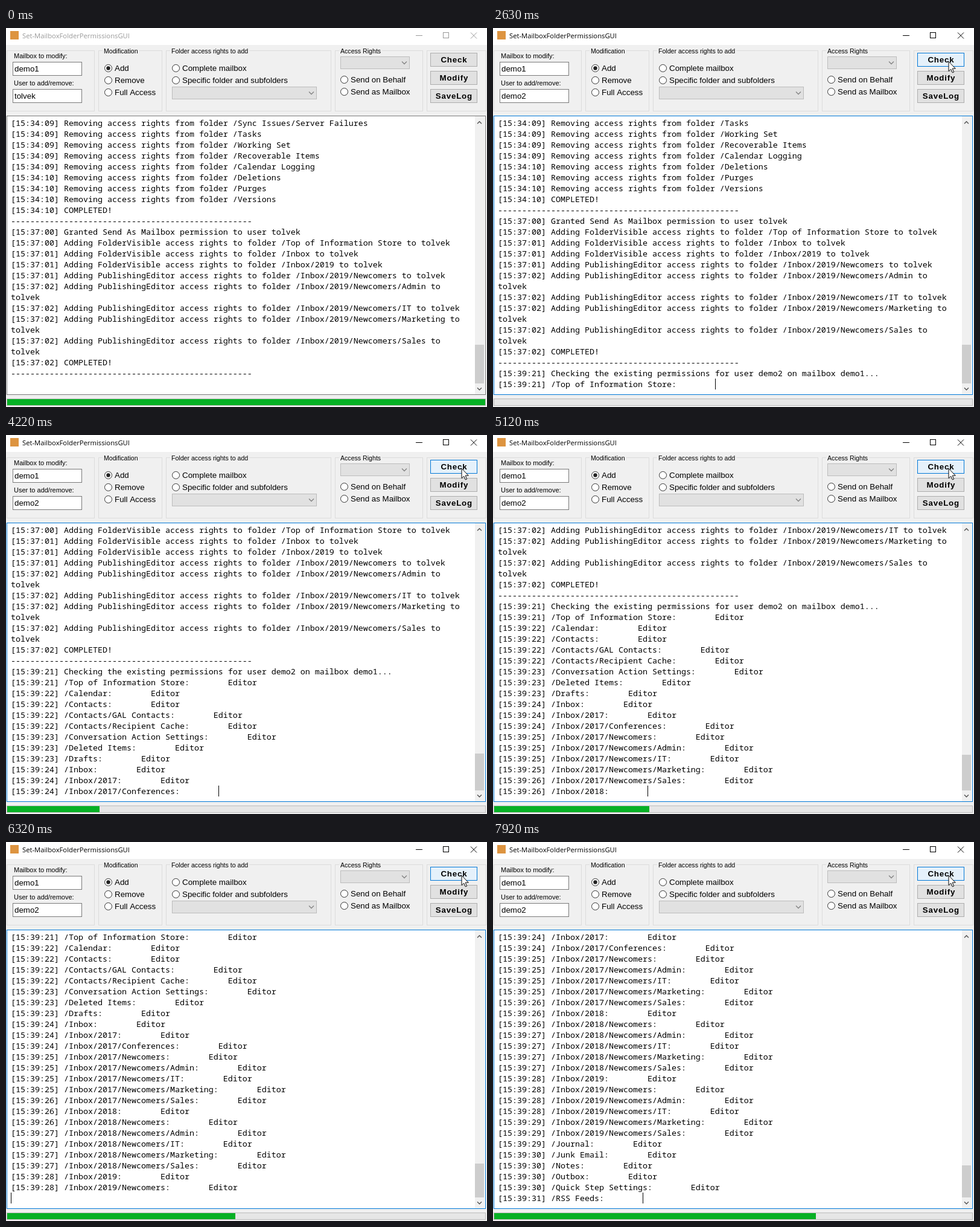
These frames come from a looping animation (797 by 627 pixels, 8000 ms). An HTML page with a canvas:

```html
<!DOCTYPE html>
<html lang="en">
<head>
<meta charset="utf-8">
<title>Mailbox permissions</title>
<style>
  html, body { margin: 0; width: 100%; height: 100%; overflow: hidden; background: #f0f0f0; }
  canvas { display: block; }
</style>
</head>
<body>
<canvas id="stage" width="797" height="627"></canvas>
<script>
const ctx = document.getElementById('stage').getContext('2d');
const LOOP = 8000;
const BLUE = '#0078d7', GREY = '#7a7a7a';
const SANS = '"Liberation Sans", Arial, sans-serif';
const UI = '13.333px ' + SANS;
const LABEL = '11px ' + SANS;
const GROUP = '10.6px ' + SANS;
const BOLD = 'bold 13.333px ' + SANS;
const MONO = '13.3333px "Noto Sans Mono", monospace';
const TITLE = '11.25px "Open Sans", sans-serif';

const OWNER = 'demo1', OLD_USER = 'tolvek', NEW_USER = 'demo2';
const ROWS = 25, ROW_H = 18, CHAR_W = 8;
const RULE = '-'.repeat(50);

// time, tick, log step, progress width
const KNOTS = [
  [0, 0, 0, 0], [70, 1, 0, 0], [2630, 34, 0, 0], [2860, 37, 2.8, 0],
  [3610, 47, 12, 84], [4220, 55, 20, 153], [5120, 67, 32, 257],
  [6320, 83, 47, 378], [7920, 104, 66, 533], [8000, 104.9, 66.9, 540]
];

function interp(x, from, to) {
  let i = 1;
  while (i < KNOTS.length - 1 && KNOTS[i][from] <= x) i++;
  const a = KNOTS[i - 1], b = KNOTS[i];
  const u = Math.min(1, Math.max(0, (x - a[from]) / (b[from] - a[from])));
  return a[to] + (b[to] - a[to]) * u;
}

// Log content
const removed = (time, names) =>
  names.map(n => `[15:34:${time}] Removing access rights from folder /${n}`);

function granted(sec, role, path, wrap) {
  const head = `[15:37:${sec}] Adding ${role} access rights to folder /${path} to`;
  return wrap ? [head, OLD_USER] : [head + ' ' + OLD_USER];
}

const NEWS = 'Inbox/2019/Newcomers';
const history = [
  ...removed('09', ['Sync Issues/Server Failures', 'Tasks', 'Working Set', 'Recoverable Items', 'Calendar Logging']),
  ...removed('10', ['Deletions', 'Purges', 'Versions']),
  '[15:34:10] COMPLETED!',
  RULE,
  `[15:37:00] Granted Send As Mailbox permission to user ${OLD_USER}`,
  ...granted('00', 'FolderVisible', 'Top of Information Store'),
  ...granted('01', 'FolderVisible', 'Inbox'),
  ...granted('01', 'FolderVisible', 'Inbox/2019'),
  ...granted('01', 'PublishingEditor', NEWS),
  ...granted('02', 'PublishingEditor', NEWS + '/Admin', true),
  ...granted('02', 'PublishingEditor', NEWS + '/IT'),
  ...granted('02', 'PublishingEditor', NEWS + '/Marketing', true),
  ...granted('02', 'PublishingEditor', NEWS + '/Sales', true),
  '[15:37:02] COMPLETED!',
  RULE
];
const checking = `[15:39:21] Checking the existing permissions for user ${NEW_USER} on mailbox ${OWNER}...`;

const teams = year => ['', '/Admin', '/IT', '/Marketing', '/Sales'].map(t => `Inbox/${year}/Newcomers${t}`);
const folders = [
  'Top of Information Store', 'Calendar', 'Contacts', 'Contacts/GAL Contacts',
  'Contacts/Recipient Cache', 'Conversation Action Settings', 'Deleted Items', 'Drafts', 'Inbox',
  'Inbox/2017', 'Inbox/2017/Conferences', ...teams(2017),
  'Inbox/2018', ...teams(2018), 'Inbox/2019', ...teams(2019),
  'Journal', 'Junk Email', 'Notes', 'Outbox', 'Quick Step Settings', 'RSS Feeds'
];
// folders handled in each second, starting at 21
const perSecond = [1, 4, 3, 3, 4, 3, 4, 4, 3, 4, 1];
const seconds = perSecond.flatMap((n, i) => Array(n).fill(21 + i));
const found = folders.map((f, i) => `[15:39:${seconds[i]}] /${f}:` + ' '.repeat(8));

function logRows(tick, step) {
  if (tick < 31) return [...history, ''];
  const rows = [...history, checking];
  if (tick < 34) return [...rows, ''];
  const n = step >> 1;
  rows.push(...found.slice(0, n).map(r => r + 'Editor'));
  if (step % 2) rows.push(found[n] + 'Editor', '');
  else rows.push(found[n]);
  return rows;
}

// Drawing helpers
function rect(x, y, w, h, color) {
  ctx.fillStyle = color;
  ctx.fillRect(x, y, w, h);
}

function box(x, y, w, h, fill, edge) {
  rect(x, y, w, h, edge);
  rect(x + 1, y + 1, w - 2, h - 2, fill);
}

function text(s, x, y, font, color = '#000') {
  ctx.font = font;
  ctx.fillStyle = color;
  ctx.fillText(s, x, y);
}

function line(points, color, width = 1) {
  ctx.beginPath();
  points.forEach(([x, y]) => ctx.lineTo(x, y));
  ctx.strokeStyle = color;
  ctx.lineWidth = width;
  ctx.stroke();
}

function chevron(x, y, dir, color, r = 4) {
  line([[x - r, y - dir * r / 2], [x, y + dir * r / 2], [x + r, y - dir * r / 2]], color, 1.3);
}

function group(x, w, title) {
  box(x, 37, w, 101, '#f0f0f0', '#dcdcdc');
  if (!title) return;
  ctx.font = GROUP;
  rect(x + 7, 37, ctx.measureText(title).width + 4, 1, '#f0f0f0');
  text(title, x + 9, 42, GROUP);
}

function radio(x, y, label, on) {
  ctx.beginPath();
  ctx.arc(x, y, 6, 0, 7);
  ctx.fillStyle = '#fff';
  ctx.fill();
  ctx.strokeStyle = '#333';
  ctx.lineWidth = 1;
  ctx.stroke();
  if (on) {
    ctx.beginPath();
    ctx.arc(x, y, 3.2, 0, 7);
    ctx.fillStyle = '#222';
    ctx.fill();
  }
  text(label, x + 10.5, y + 4.5, UI);
}

function combo(x, y, w) {
  box(x, y, w, 21, '#e1e1e1', '#bcbcbc');
  chevron(x + w - 9, y + 10.5, 1, '#838383');
}

function button(y, label, state) {
  const [fill, edge] = { hover: ['#e5f1fb', BLUE], down: ['#cce4f7', '#005499'] }[state] || ['#e1e1e1', '#adadad'];
  box(703, y, 78, 23, fill, edge);
  ctx.letterSpacing = '0.8px';
  ctx.textAlign = 'center';
  text(label, 742.4, y + 16, BOLD);
  ctx.textAlign = 'left';
  ctx.letterSpacing = '0px';
}

function arrow(x, y) {
  const shape = [[0, 0], [0, 16], [3.7, 12.6], [6.3, 18.4], [8.7, 17.4], [6.2, 11.6], [11.3, 11.6]];
  ctx.beginPath();
  shape.forEach(([dx, dy]) => ctx.lineTo(x + dx, y + dy));
  ctx.closePath();
  ctx.fillStyle = '#fff';
  ctx.fill();
  ctx.strokeStyle = '#000';
  ctx.lineWidth = 1;
  ctx.stroke();
}

function beam(x, y) {
  rect(x, y - 8, 1, 16, '#000');
  rect(x - 3, y - 8, 7, 1, '#000');
  rect(x - 3, y + 7, 7, 1, '#000');
}

// Window parts
function titleBar(active) {
  const ink = active ? '#000' : '#999';
  rect(0, 0, 797, 28, '#fff');
  rect(7, 5, 14, 14, '#dd9440');
  text('Set-MailboxFolderPermissionsGUI', 27, 17, TITLE, ink);
  rect(679, 12, 11, 1, ink);
  box(724, 7, 10, 10, '#fff', ink);
  line([[770, 7.5], [780, 17.5]], ink);
  line([[780, 7.5], [770, 17.5]], ink);
}

function userField(tick) {
  const focused = tick >= 5 && tick < 28;
  box(11, 101, 115, 23, '#fff', focused ? BLUE : GREY);
  const value = tick < 12 ? OLD_USER : NEW_USER.slice(0, tick - 11);
  text(value, 14, 117, UI);
  const end = 14 + ctx.measureText(value).width;
  if (tick > 5 && tick < 12) {
    const from = 14 + (end - 14) * (11 - tick) / 5;
    ctx.save();
    ctx.beginPath();
    ctx.rect(from, 104, end - from, 17);
    ctx.clip();
    rect(from, 104, end - from, 17, BLUE);
    text(value, 14, 117, UI, '#fff');
    ctx.restore();
  } else if (focused) {
    rect(Math.round(end), 105, 1, 15, '#000');
  }
}

function controls(tick) {
  group(1, 146);
  text('Mailbox to modify:', 13, 50, LABEL);
  box(11, 56, 115, 23, '#fff', GREY);
  text(OWNER, 14, 72, UI);
  text('User to add/remove:', 13, 95, LABEL);
  userField(tick);

  group(153, 106, 'Modification');
  ['Add', 'Remove', 'Full Access'].forEach((s, i) => radio(169.5, 66.5 + 20 * i, s, i === 0));

  group(265, 274, 'Folder access rights to add');
  radio(281.5, 66.5, 'Complete mailbox');
  radio(281.5, 86.5, 'Specific folder and subfolders');
  combo(275, 97, 240);

  group(545, 146, 'Access Rights');
  combo(554, 47, 115);
  radio(560.5, 85.5, 'Send on Behalf');
  radio(560.5, 105.5, 'Send as Mailbox');

  group(697, 99);
  button(41, 'Check', tick < 24 ? '' : tick === 28 ? 'down' : 'hover');
  button(71, 'Modify');
  button(101, 'SaveLog');
}

function logBox(tick, step) {
  const focused = tick >= 28;
  box(1, 145, 794, 462, '#fff', focused ? BLUE : tick > 0 && tick < 5 ? '#171717' : GREY);
  const rows = logRows(tick, step).slice(-ROWS);
  rows.forEach((row, i) => text(row, 8, 162 + ROW_H * i, MONO));
  if (focused) rect(8 + CHAR_W * rows[ROWS - 1].length, 580, 1, 18, '#000');

  rect(777, 146, 16, 460, '#f0f0f0');
  const top = Math.round(524 + step / 6);
  rect(777, top, 15, 588 - top, '#cdcdcd');
  chevron(784.5, 156.5, -1, '#505050', 3.5);
  chevron(784.5, 597, 1, '#505050', 3.5);
}

function progress(tick, width) {
  box(1, 613, 794, 12, '#e6e6e6', '#bcbcbc');
  rect(2, 614, tick < 29 ? 792 : Math.round(width), 10, '#06b025');
}

function pointer(tick) {
  const mix = (a, b, u) => a + (b - a) * u;
  if (tick < 1 || (tick > 11 && tick < 17)) return;
  if (tick <= 5) {
    const u = (tick - 1) / 4;
    beam(Math.round(mix(170, 54, u)), Math.round(mix(260, 113, u)));
  } else if (tick <= 11) {
    beam(Math.round(mix(54, 14, (tick - 5) / 6)), 113);
  } else if (tick <= 22) {
    const u = (tick - 16) / 6;
    arrow(mix(60, 697.5, u) , 34.5 + 76 * (1 - u) ** 2);
  } else {
    const u = Math.min(1, (tick - 22) / 5);
    const e = 1 - (1 - u) ** 2;
    arrow(mix(697.5, 755, e), mix(34.5, 55.5, e));
  }
}

function draw(t) {
  const tick = Math.floor(interp(t, 0, 1) + 0.02);
  const step = Math.floor(interp(tick, 1, 2) + 1e-6);
  rect(0, 0, 797, 627, '#f0f0f0');
  titleBar(tick >= 5);
  controls(tick);
  logBox(tick, step);
  progress(tick, interp(tick, 1, 3));
  pointer(tick);
}

const start = performance.now();
function loop() {
  draw((performance.now() - start) % LOOP);
  requestAnimationFrame(loop);
}
loop();
</script>
</body>
</html>
```
